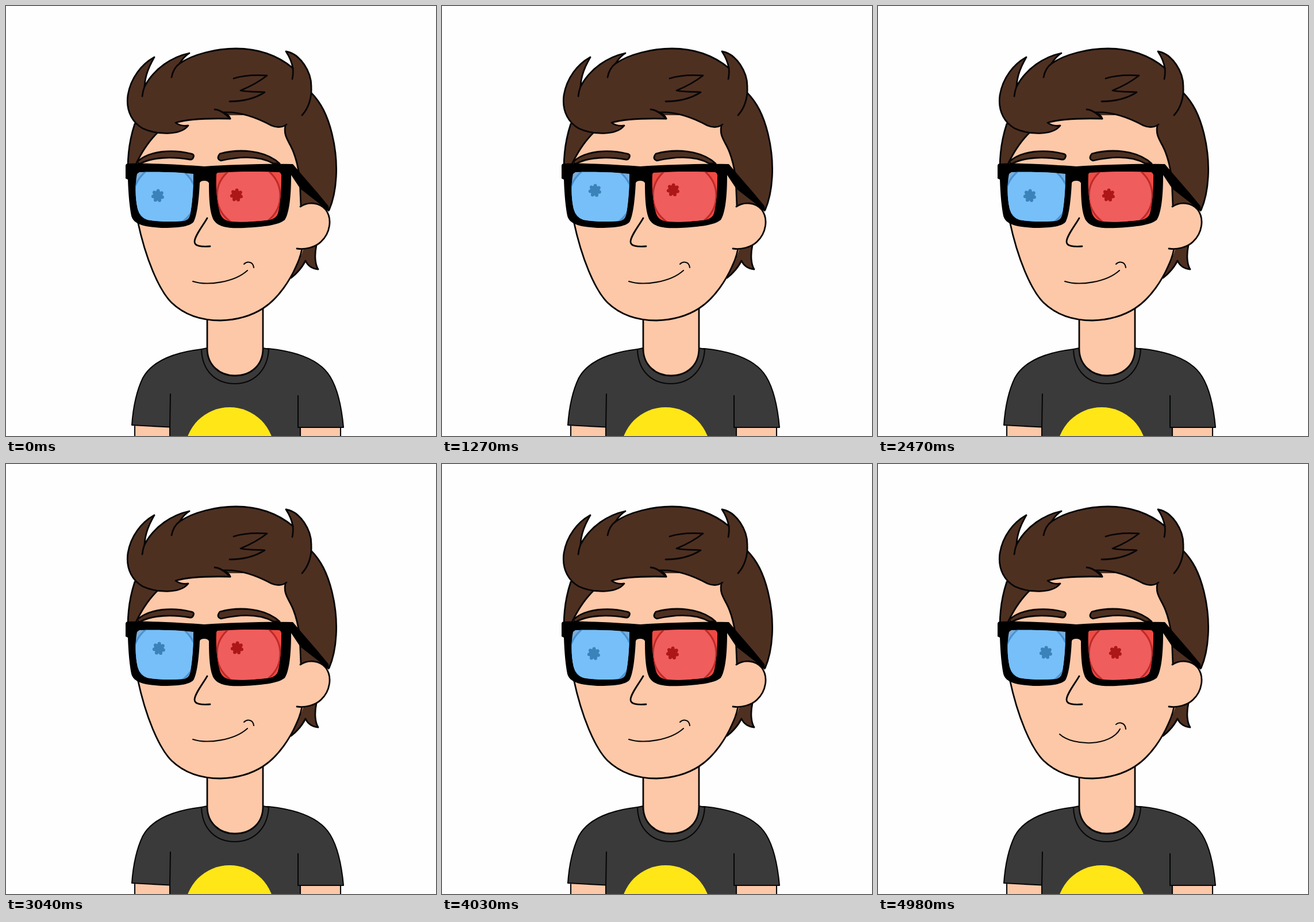
Write an HTML page that moves like this. It is 748 px wide and 748 px high and loops after 6.23 s.

```html
<!DOCTYPE html>
<html lang="en">
<head>
<meta charset="utf-8">
<title>Portrait with 3D glasses</title>
<style>
  html, body { margin: 0; width: 100%; height: 100%; overflow: hidden; background: #fefefe; }
  svg { display: block; width: 100%; height: 100%; }
  .ink { stroke: #080606; stroke-width: 2.8; stroke-linecap: round; stroke-linejoin: round; }
  .line { fill: none; }
  .skin { fill: #fdc8a8; }
  .hair { fill: #4e3021; }
  .shirt { fill: #3a3a3a; }
  .thin { stroke-width: 2.1; }
</style>
</head>
<body>
<svg viewBox="0 0 748 748">
  <defs>
    <path id="lensL" d="M232 289C265 288 300 289 326 292C326 318 324 345 320 364Q318 373 308 374C285 376 262 375 246 372Q233 368 229 353C224 332 225 306 228 292Z"/>
    <path id="lensR" d="M368 290C400 288 440 288 475 289Q480 291 479 298C479 322 477 345 473 361Q470 370 458 372C435 375 412 376 394 375C379 374 373 367 371 355C366 335 365 310 366 292Z"/>
    <clipPath id="clipL"><use href="#lensL"/></clipPath>
    <clipPath id="clipR"><use href="#lensR"/></clipPath>
    <g id="blob"></g>
  </defs>

  <!-- body -->
  <path class="skin" d="M224 728H286V748H224ZM512 728H582V748H512Z"/>
  <path class="ink line thin" d="M224 731V750M582 732V750"/>
  <path class="ink shirt thin" d="M340 597C297 602 255 616 238 647C227 670 221 700 219 729L285 732.5V752H512V733H587C584 700 578 668 564 645C546 615 505 601 457 596Z"/>
  <path class="ink line thin" d="M286 675L285 733M508 678V733H512"/>
  <circle cx="389" cy="776" r="78" fill="#ffe617"/>
  <path class="ink shirt thin" d="M340 597C341 635 365 657 398 657C430 657 455 635 457 597L447 595H350Z"/>
  <path class="ink skin" d="M350 520V596C350 625 372 643 398 643C426 643 447 625 447 596V520"/>

  <!-- head -->
  <path class="ink hair" d="M540 416C536 435 538 450 543 458C533 457 525 452 521 443C515 455 506 465 496 473L512 412Z"/>
  <path class="ink hair" d="M224 205C215 232 212 255 212 282L512 350L562 355C575 325 580 275 567 222C559 190 548 168 530 150Z"/>
  <path class="skin" d="M229 374L226 275C237 252 250 233 265 219L300 190H480L486 208C483 222 488 230 495 243C505 262 509 285 511 300L514 350L530 380L519 416C516 428 512 438 505 452C495 475 475 508 447 526C430 537 405 546 373 547C340 547 311 538 288 516C266 494 243 440 229 374Z"/>
  <path class="ink line" d="M226 275C237 252 250 233 265 219M486 208C483 222 488 230 495 243C505 262 509 285 511 300L513 348M515 422C512 438 509 443 505 452C495 475 475 508 447 526C430 537 405 546 373 547C340 547 311 538 288 516C266 494 243 440 229 374"/>
  <path class="ink skin" d="M512 349C525 340 545 341 556 354C568 370 564 395 548 410C538 420 520 424 506 422"/>

  <path class="ink hair" d="M515 190C526 178 532 160 531 142C532 115 512 83 487 79C493 88 497 97 499 108C470 84 435 74 400 74C365 74 325 84 302 100C307 92 312 86 319 82C290 88 258 108 241 140C242 120 249 105 258 89C236 101 217 125 212 155C208 185 222 204 238 213C262 224 303 226 317 208C308 209 300 207 295 203C315 197 350 195 390 196C388 190 384 187 378 185C410 183 440 196 462 208C472 212 480 212 488 206"/>
  <path class="ink line" d="M241 140Q238 148 237 157M302 100Q291 108 288 124M499 108Q500 118 498 127M363 180C372 180 381 187 390 196M396 126C415 120 440 120 454 121C440 132 425 140 408 147C422 150 440 149 450 150C430 163 410 166 389 166"/>
  <path class="ink hair" d="M228 271C250 251 290 249 322 257Q328 258 326 263Q324 268 320 267C290 262 255 262 232 275ZM372 257C405 248 450 250 476 274L465 274C440 260 405 262 374 269Q365 266 372 257Z"/>

  <path class="ink line" d="M350 369C342 383 328 400 328 410C328 418 340 419 355 418"/>
  <path id="mouth" class="ink line thin"/>

  <!-- glasses -->
  <path d="M208 278Q208 274 213 274C250 273 310 276 345 279C390 276 450 274 499 275L516 295L542 325L561 348L562 358L548 346L512 318L496 294C496 330 493 360 485 372C475 381 450 384 415 386C390 387 370 386 361 372C355 360 353 340 353 308Q351 304 345 304Q338 304 337 308C336 330 333 365 326 376C318 384 300 386 270 386C240 384 222 380 218 365C215 350 213 330 212 302L208 300Z"/>
  <use href="#lensL" fill="#79aede"/>
  <use href="#lensR" fill="#f04b43"/>
  <g id="open">
    <g clip-path="url(#clipL)">
      <circle cx="276" cy="331" r="54" fill="#77bff8" stroke="#4a92d0" stroke-width="3"/>
      <use id="pupilL" href="#blob" fill="#3b82ba"/>
    </g>
    <g clip-path="url(#clipR)">
      <circle cx="422" cy="330" r="55" fill="#f05d5d" stroke="#bd2a2a" stroke-width="3"/>
      <use id="pupilR" href="#blob" fill="#ad1717"/>
    </g>
  </g>
  <g id="shut" fill="none" stroke-width="2.4" stroke-linecap="round">
    <g clip-path="url(#clipL)" stroke="#3f82be">
      <path d="M225 329C255 323 295 323 327 327"/>
      <path d="M225 306L226 289H233Z" fill="#3f82be" stroke="none"/>
    </g>
    <path clip-path="url(#clipR)" stroke="#b8221f" d="M368 328C400 323 440 323 477 330M372 306C367 320 367 335 374 351M474 308C480 325 478 340 471 352"/>
  </g>
</svg>
<script>
const $ = id => document.getElementById(id);
const LOOP = 6230;

const dot = (x, y, r) => `<circle cx="${x.toFixed(2)}" cy="${y.toFixed(2)}" r="${r}"/>`;
let bumps = dot(0, 0, 8.6);
for (let i = 0; i < 7; i++) {
  const a = i * Math.PI * 2 / 7 - 1.5;
  bumps += dot(8.2 * Math.cos(a), 8.6 * Math.sin(a), 3);
}
$('blob').innerHTML = bumps;

const calm = 'M325 479C350 487 397 481 420 460M414 449C420 443 430 445 431 455';
const grin = 'M318 475C345 493 405 492 422 456M414 449C420 443 430 445 431 455';
const smile = 'M316 470C340 492 405 491 421 461M414 453C420 448 430 450 431 461';

// pupils: [left x, left y, right x, right y]; no pupils means eyes closed
const rest = { eyes: [264, 330, 401, 329], mouth: calm };
const mid = { eyes: [266, 321, 402, 320], mouth: calm };
const up = { eyes: [265, 312, 401, 311], mouth: calm };
const side = { eyes: [292, 328, 413, 328], mouth: calm };
const blink = { eyes: null, mouth: grin };
const happy = { eyes: side.eyes, mouth: smile };

const steps = [
  [0, rest], [700, mid], [860, up], [1270, mid], [1470, rest], [1970, side],
  [2470, rest], [3040, mid], [3370, up], [3780, mid], [4030, rest],
  [4730, blink], [4980, happy]
];

let shown;
function show(pose) {
  if (pose === shown) return;
  shown = pose;
  const { eyes, mouth } = pose;
  $('mouth').setAttribute('d', mouth);
  $('open').style.display = eyes ? '' : 'none';
  $('shut').style.display = eyes ? 'none' : '';
  if (!eyes) return;
  $('pupilL').setAttribute('transform', `translate(${eyes[0]} ${eyes[1]})`);
  $('pupilR').setAttribute('transform', `translate(${eyes[2]} ${eyes[3]})`);
}

const start = performance.now();
function tick() {
  const t = (performance.now() - start) % LOOP;
  show(steps.findLast(([at]) => at <= t)[1]);
  requestAnimationFrame(tick);
}
tick();
</script>
</body>
</html>
```
